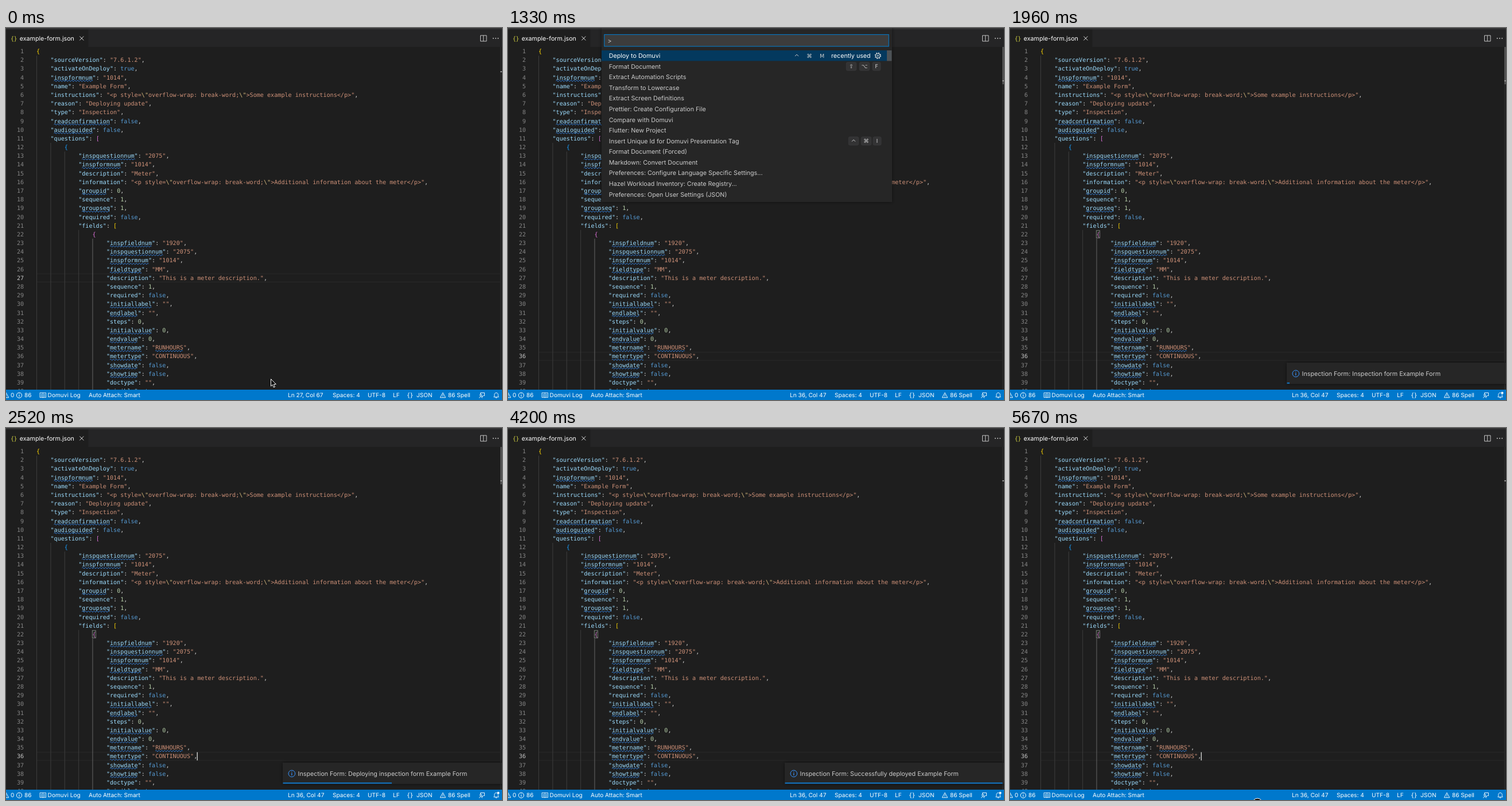
Write an HTML page that moves like this. It is 864 px wide and 648 px high and loops after 5740 ms.

```html
<!DOCTYPE html>
<html lang="en">
<head>
<meta charset="utf-8">
<title>Deploying a form from the editor</title>
<style>
  html, body { margin: 0; width: 100%; height: 100%; overflow: hidden; background: #1e1e1e; }
  svg { display: block; width: 864px; height: 648px; }
  text { text-rendering: geometricPrecision; white-space: pre; }
  .code { font: 10.115px "DejaVu Sans Mono", monospace; }
  .ui { font: 10.7px Inter, sans-serif; fill: #ccc; }
  .key { font: 9.5px "DejaVu Sans", sans-serif; fill: #ccc; text-anchor: middle; }
  .status { font: 10.1px Inter, sans-serif; fill: #fff; }
  .num { text-anchor: end; fill: #858585; }
  .num.on { fill: #c6c6c6; }
  .line { fill: none; }
</style>
</head>
<body>
<svg id="stage" viewBox="0 0 864 648" xmlns="http://www.w3.org/2000/svg"></svg>
<script>
const LOOP = 5740, TICK = 70;
const LEFT = 53.1, TOP = 33, CELL = 6.09, ROW = 15.18;

// Each line starts with its indent level.
const doc = String.raw`0{
1"sourceVersion": "7.6.1.2",
1"activateOnDeploy": true,
1"inspformnum": "1014",
1"name": "Example Form",
1"instructions": "<p style=\"overflow-wrap: break-word;\">Some example instructions</p>",
1"reason": "Deploying update",
1"type": "Inspection",
1"readconfirmation": false,
1"audioguided": false,
1"questions": [
2{
3"inspquestionnum": "2075",
3"inspformnum": "1014",
3"description": "Meter",
3"information": "<p style=\"overflow-wrap: break-word;\">Additional information about the meter</p>",
3"groupid": 0,
3"sequence": 1,
3"groupseq": 1,
3"required": false,
3"fields": [
4{
5"inspfieldnum": "1920",
5"inspquestionnum": "2075",
5"inspformnum": "1014",
5"fieldtype": "MM",
5"description": "This is a meter description.",
5"sequence": 1,
5"required": false,
5"initiallabel": "",
5"endlabel": "",
5"steps": 0,
5"initialvalue": 0,
5"endvalue": 0,
5"metername": "RUNHOURS",
5"metertype": "CONTINUOUS",
5"showdate": false,
5"showtime": false,
5"doctype": "",
5"visible": true,`.split("\n");

const flagged = new Set(("inspformnum readconfirmation audioguided inspquestionnum groupid groupseq " +
  "inspfieldnum fieldtype initiallabel endlabel initialvalue endvalue metername RUNHOURS " +
  "metertype showdate showtime").split(" "));
const bracketColors = ["#ffd700", "#da70d6", "#179fff"];

const esc = s => String(s).replace(/&/g, "&amp;").replace(/</g, "&lt;");
const text = (cls, x, y, s, extra = "") => `<text class="${cls}" x="${x}" y="${y}" ${extra}>${esc(s)}</text>`;
const rect = (x, y, w, h, fill, extra = "") =>
  `<rect x="${x}" y="${y}" width="${w}" height="${h}" fill="${fill}" ${extra}/>`;
const path = (d, stroke, extra = "") => `<path class="line" d="${d}" stroke="${stroke}" ${extra}/>`;
const ring = (x, y, r, stroke, extra = "") =>
  `<circle class="line" cx="${x}" cy="${y}" r="${r}" stroke="${stroke}" ${extra}/>`;
const group = (id, body) => `<g id="${id}">${body}</g>`;
const rowTop = line => TOP + (line - 1) * ROW;
const colX = col => LEFT + col * CELL;

function words(s, col, y, color) {
  return [...s.matchAll(/\S+/g)]
    .map(m => text("code", colX(col + m.index).toFixed(2), y, m[0], `fill="${color}"`)).join("");
}

function squiggle(col, length, y) {
  const halves = Math.round(length * CELL / 2.5);
  return path(`M${colX(col)} ${y}q1.25 -2.2 2.5 0` + "t2.5 0".repeat(halves - 1), "#3794ff", 'stroke-width=".9"');
}

let depth = 0;
function codeLine(src, i) {
  const indent = src[0] * 4, y = (rowTop(i + 1) + 11.1).toFixed(2);
  let out = text("code num", 31.2, y, i + 1, `id="n${i + 1}"`);
  for (const m of src.slice(1).matchAll(/"(?:\\.|[^"\\])*"|true|false|\d+|[{\[]|[:,]/g)) {
    const s = m[0], col = indent + m.index;
    if (s[0] === '"') {
      const isKey = src[1 + m.index + s.length] === ":";
      let at = col;
      for (const part of s.split(/(\\")/)) {
        out += words(part, at, y, isKey ? "#9cdcfe" : part === '\\"' ? "#d7ba7d" : "#ce9178");
        at += part.length;
      }
      const word = s.slice(1, -1);
      if (flagged.has(word)) out += squiggle(col + 1, word.length, +y + 2.4);
    } else {
      const color = /[{\[]/.test(s) ? bracketColors[depth++ % 3]
        : /[:,]/.test(s) ? "#d4d4d4" : /\d/.test(s) ? "#b5cea8" : "#569cd6";
      out += words(s, col, y, color);
    }
  }
  return out;
}

const guide = (col, fromLine, color) => rect(colX(col).toFixed(1), rowTop(fromLine), 0.9, 640, color);

function editor() {
  const guides = [[0, 2], [4, 12], [8, 13], [12, 22]].map(g => guide(...g, "#404040")).join("");
  return group("current", rect(53, 0, 808, 1, "#2a2a2a") + rect(53, ROW - 1, 808, 1, "#2a2a2a"))
    + guides + guide(16, 23, "#6e6e6e")
    + group("bracket", rect(colX(16) - 0.2, rowTop(22) + 1, 6, 13, "#00640022", 'stroke="#888" stroke-width=".9"'))
    + doc.map(codeLine).join("")
    + group("caret", rect(332.5, rowTop(36) + 0.4, 1.5, 14.4, "#c4c5c3"))
    + rect(861, 33, 0.8, 597, "#343434")
    + group("slider", rect(861, 33, 3, 65, "#797979", 'opacity=".55"'))
    + group("mark", rect(861, 0, 3, 1.6, "#a0a0a0"));
}

function tabs() {
  return rect(0, 0, 864, 33, "#252526") + rect(0, 0, 143.5, 33, "#1e1e1e") + rect(0, 0, 864, 2.4, "#343435")
    + text("code", 8, 21.6, "{", 'fill="#cbcb41"') + text("code", 13.5, 21.6, "}", 'fill="#cbcb41"')
    + text("ui", 23.8, 22, "example-form.json", 'style="fill:#fff"')
    + path("M128.3 14.5l7 7m0 -7l-7 7", "#ddd")
    + path("M826.5 13h10.5v10h-10.5zM831.7 13v10", "#c5c5c5")
    + [848.8, 853, 857.2].map(x => `<circle cx="${x}" cy="18" r=".95" fill="#c5c5c5"/>`).join("");
}

const commands = ["Deploy to Domuvi", "Format Document", "Extract Automation Scripts", "Transform to Lowercase",
  "Extract Screen Definitions", "Prettier: Create Configuration File", "Compare with Domuvi",
  "Flutter: New Project", "Insert Unique Id for Domuvi Presentation Tag", "Format Document (Forced)",
  "Markdown: Convert Document", "Preferences: Configure Language Specific Settings...",
  "Hazel Workload Inventory: Create Registry...", "Preferences: Open User Settings (JSON)"];
const shortcuts = [[0, "⌃", 503], [0, "⌘", 525], [0, "M", 547], [1, "⇧", 598], [1, "⌥", 621], [1, "F", 642],
  [8, "⌃", 602], [8, "⌘", 624], [8, "I", 643]];

function keyCap([row, label, x]) {
  const y = 48.3 + row * 18.57, w = /[A-Z]/.test(label) ? 14 : 17.5;
  const cap = row ? rect(x - w / 2, y - 7.2, w, 14.4, "#333334", 'rx="2.4" stroke="#3c3c3d" stroke-width=".8"') : "";
  const glyph = label === "⌃" ? path(`M${x - 3} ${y + 0.8}l3 -3l3 3`, "#ccc") : text("key", x, y + 3.5, label);
  return cap + glyph;
}

function palette() {
  return rect(163, 0, 506, 303, "#252526", 'filter="url(#shadow)"') + rect(163, 0, 506, 2.4, "#343435")
    + rect(167.8, 11.4, 495.4, 20.6, "#3c3c3c", 'stroke="#007fd4"')
    + text("ui", 173.5, 25.8, ">")
    + group("inputCaret", rect(181.5, 15, 1, 13, "#ccc"))
    + rect(163, 39, 497, 18.4, "#04395e") + rect(660, 39, 8.4, 18.4, "#4d5256")
    + commands.map((c, i) => text("ui", 175.8, (52.2 + i * 18.57).toFixed(2), c, i ? "" : 'style="fill:#fff"')).join("")
    + shortcuts.map(keyCap).join("")
    + text("ui", 563, 52.2, "recently used", 'style="fill:#fff"')
    + ring(644.3, 48.3, 4.9, "#ddd", 'stroke-width="1.4" stroke-dasharray="2 1.85"')
    + ring(644.3, 48.3, 3.9, "#ddd") + ring(644.3, 48.3, 1.2, "#ddd");
}

function toast() {
  return rect(482, 583, 390, 37, "#252526", 'filter="url(#shadow)"')
    + ring(497.8, 602, 5.8, "#3794ff")
    + path("M497.8 601v4.2M497.8 598.4v1.3", "#3794ff", 'stroke-width="1.2"')
    + text("ui", 508.6, 605.8, "", 'id="message"')
    + rect(482.5, 617.6, 0, 1.9, "#0e7ad0", 'id="bar"');
}

const warning = x => path(`M${x} 635.2l4.7 8.6h-9.4zM${x} 638.2v2.8M${x} 642v1`, "#fff", 'stroke-width=".9"');

function statusBar() {
  const items = [[8, "0"], [32, "86"], [72.6, "Domuvi Log"], [144, "Auto Attach: Smart"], [569, "Spaces: 4"],
    [630, "UTF-8"], [674, "LF"], [715, "JSON"], [770, "86 Spell"]];
  const page = "m0 2h2.3m-2.3 2h2.3m-2.3 1.9h2.3";
  return rect(0, 630, 864, 18, "#0078cc")
    + items.map(([x, s]) => text("status", x, 643.4, s)).join("")
    + text("status", 491, 643.4, "", 'id="position"')
    + text("code", 698, 643, "{", 'fill="#fff"') + text("code", 703.5, 643, "}", 'fill="#fff"')
    + warning(0) + warning(761)
    + ring(23, 639.8, 4.6, "#fff") + path("M23 639v3.4M23 636.8v1.2", "#fff")
    + path(`M59 635.5h10.6v8h-10.6zM64.3 635.5v9M60.6 636${page}M65.8 636${page}`, "#fff", 'stroke-width=".8"')
    + path("M826.5 638v-2.5h7v5h-2l-2 2v-2M824.5 644.5c0 -3 5 -3 5 0", "#fff", 'stroke-width=".9"')
    + ring(827, 639.4, 1.5, "#fff")
    + path("M849.8 642.8h8.4l-1 -1.7v-2.6c0 -4 -6.4 -4 -6.4 0v2.6zM852.8 643.2c0 1.8 2.4 1.8 2.4 0", "#fff", 'stroke-width=".9"')
    + group("dot", '<circle cx="857.4" cy="635.8" r="2.4" fill="#fff" stroke="#0078cc" stroke-width=".6"/>');
}

function pointers() {
  const beam = "M-3 -7.2c2 0 3 .7 3 2v10.4c0 1.3 -1 2 -3 2M3 -7.2c-2 0 -3 .7 -3 2v10.4c0 1.3 1 2 3 2M-1.6 1.8h3.2";
  return group("arrow", '<path d="M461.5 611.5v12.4l2.8 -2.6l2 4.7l2.1 -.9l-2 -4.6h3.9z" fill="#000" stroke="#fff"/>')
    + group("beam", path(beam, "#eee", 'stroke-width="2.4"') + path(beam, "#222", 'stroke-width=".9"'))
    + group("edge", '<circle cx="431" cy="653.5" r="8.4" fill="#111" stroke="#fff"/>');
}

const stage = document.getElementById("stage");
stage.innerHTML = '<defs><filter id="shadow" x="-10%" y="-30%" width="120%" height="160%">'
  + '<feDropShadow dx="0" dy="0" stdDeviation="3" flood-color="#000" flood-opacity=".5"/></filter></defs>'
  + rect(0, 0, 864, 648, "#1e1e1e") + editor() + tabs()
  + group("palette", palette()) + group("toast", toast()) + statusBar() + pointers();

const el = id => document.getElementById(id);
const show = (id, on) => el(id).setAttribute("opacity", +on);
const move = (id, x, y) => el(id).setAttribute("transform", `translate(${x} ${y})`);

// Piecewise linear value from [time, value] steps.
function track(steps, t) {
  const i = steps.findIndex(s => s[0] > t);
  if (i === 0) return steps[0][1];
  if (i < 0) return steps[steps.length - 1][1];
  const [t0, a] = steps[i - 1], [t1, b] = steps[i];
  return a + (b - a) * (t - t0) / (t1 - t0);
}

const CLICK = 350, OPEN = 840, RUN = 1400, NOTIFY = 1820, DISMISS = 5320;
const caretOn = [[CLICK, OPEN], [RUN, NOTIFY], [2310, 2800], [3430, 3990], [4410, 4830], [5320, LOOP]];
const beamX = [[0, 465], [70, 468], [280, 480]];
const beamY = [[0, 618], [70, 606], [140, 588], [210, 573], [280, 566]];
const sliderFade = [[70, 0], [210, 1], [2800, 1], [3200, 0]];
const toastFade = [[NOTIFY, 0], [1960, 1]];
const toastSlide = [[NOTIFY, 37], [1960, 0]];
const progress = [[2380, 0.012], [2450, 0.36], [2520, 0.5], [3150, 0.5], [3220, 0.664], [3290, 1]];

function message(t) {
  const step = t < 2380 ? "Inspection form" : t < 4130 ? "Deploying inspection form" : "Successfully deployed";
  return `Inspection Form: ${step} Example Form`;
}

function draw(t) {
  const clicked = t >= CLICK, open = t >= OPEN && t < RUN, notified = t >= NOTIFY && t < DISMISS;
  move("current", 0, rowTop(clicked ? 36 : 27));
  el("n27").classList.toggle("on", !clicked);
  el("n36").classList.toggle("on", clicked);
  el("position").textContent = clicked ? "Ln 36, Col 47" : "Ln 27, Col 67";
  move("mark", 0, clicked ? 91.2 : 75.4);
  show("bracket", clicked && !open);
  show("caret", caretOn.some(([a, b]) => t >= a && t < b));
  show("slider", track(sliderFade, t));

  show("palette", open);
  show("inputCaret", t < 1330);

  show("toast", notified ? track(toastFade, t) : 0);
  move("toast", 0, track(toastSlide, t));
  show("dot", notified);
  el("message").textContent = message(t);
  el("bar").setAttribute("width", 379 * track(progress, t));

  show("arrow", t < 70);
  show("beam", t >= 70 && t < OPEN);
  move("beam", track(beamX, t), track(beamY, t));
  show("edge", t >= 5600);
  move("edge", 0, t < 5670 ? 1.5 : 0);
}

const start = performance.now();
function frame() {
  const t = (performance.now() - start) % LOOP;
  draw(Math.floor(t / TICK) * TICK);
  requestAnimationFrame(frame);
}
draw(0);
requestAnimationFrame(frame);
</script>
</body>
</html>
```
